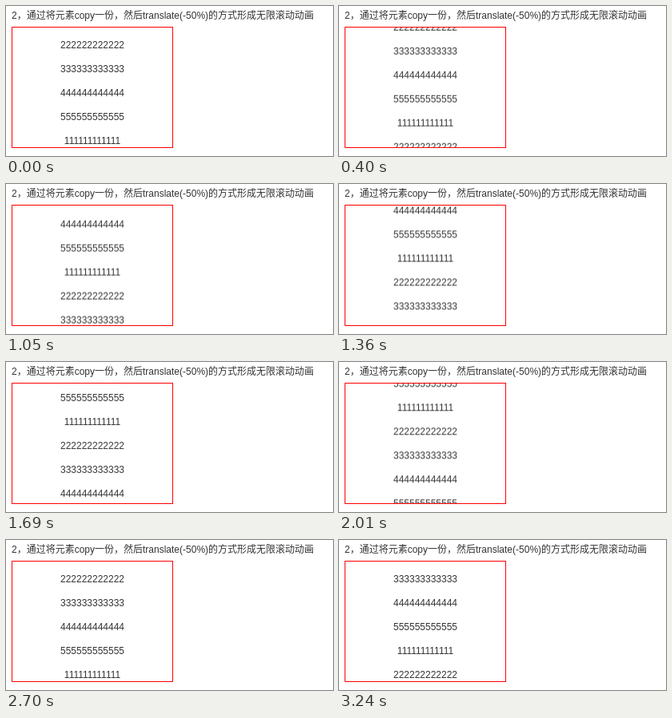
Recreate the animation shown at these times as an HTML page. Size 409 by 188 pixels, loop 3.34 s.

```html
<!DOCTYPE html>
<html lang="zh-CN">
<head>
<meta charset="utf-8">
<title>无限滚动</title>
<style>
  html, body {
    margin: 0;
    width: 100%;
    height: 100%;
    overflow: hidden;
    background: #fff;
  }
  body {
    position: relative;
    color: #333;
    font: 12px "Liberation Sans", Arial, "Noto Sans CJK SC", "Noto Sans CJK", sans-serif;
  }
  .title {
    position: absolute;
    left: 7px;
    top: 0;
    line-height: 24px;
    white-space: nowrap;
  }
  .box {
    position: absolute;
    left: 7px;
    top: 26px;
    width: 200px;
    height: 150px;
    border: 1px solid #f00;
    overflow: hidden;
  }
  .list {
    line-height: 30px;
    text-align: center;
    will-change: transform;
  }
</style>
</head>
<body>
<div class="title">2，通过将元素copy一份，然后translate(-50%)的方式形成无限滚动动画</div>
<div class="box"><div class="list" id="list"></div></div>
<script>
  const LOOP = 3340;
  const SCROLL_END = 3240;
  const LIST_HEIGHT = 150;
  const SCROLL_PERIOD = 2700;
  const START_OFFSET = 23.5;

  const list = document.getElementById("list");

  // Two copies of the rows make the wrap-around seamless.
  for (let i = 0; i < 10; i++) {
    const row = document.createElement("div");
    row.textContent = String(i % 5 + 1).repeat(12);
    list.append(row);
  }

  function render(now) {
    const time = Math.min(now % LOOP, SCROLL_END);
    const offset = (START_OFFSET + time / SCROLL_PERIOD * LIST_HEIGHT) % LIST_HEIGHT;
    list.style.transform = `translate3d(0, ${-offset}px, 0)`;
  }

  const start = performance.now();
  function tick() {
    render(performance.now() - start);
    requestAnimationFrame(tick);
  }
  tick();
</script>
</body>
</html>
```
